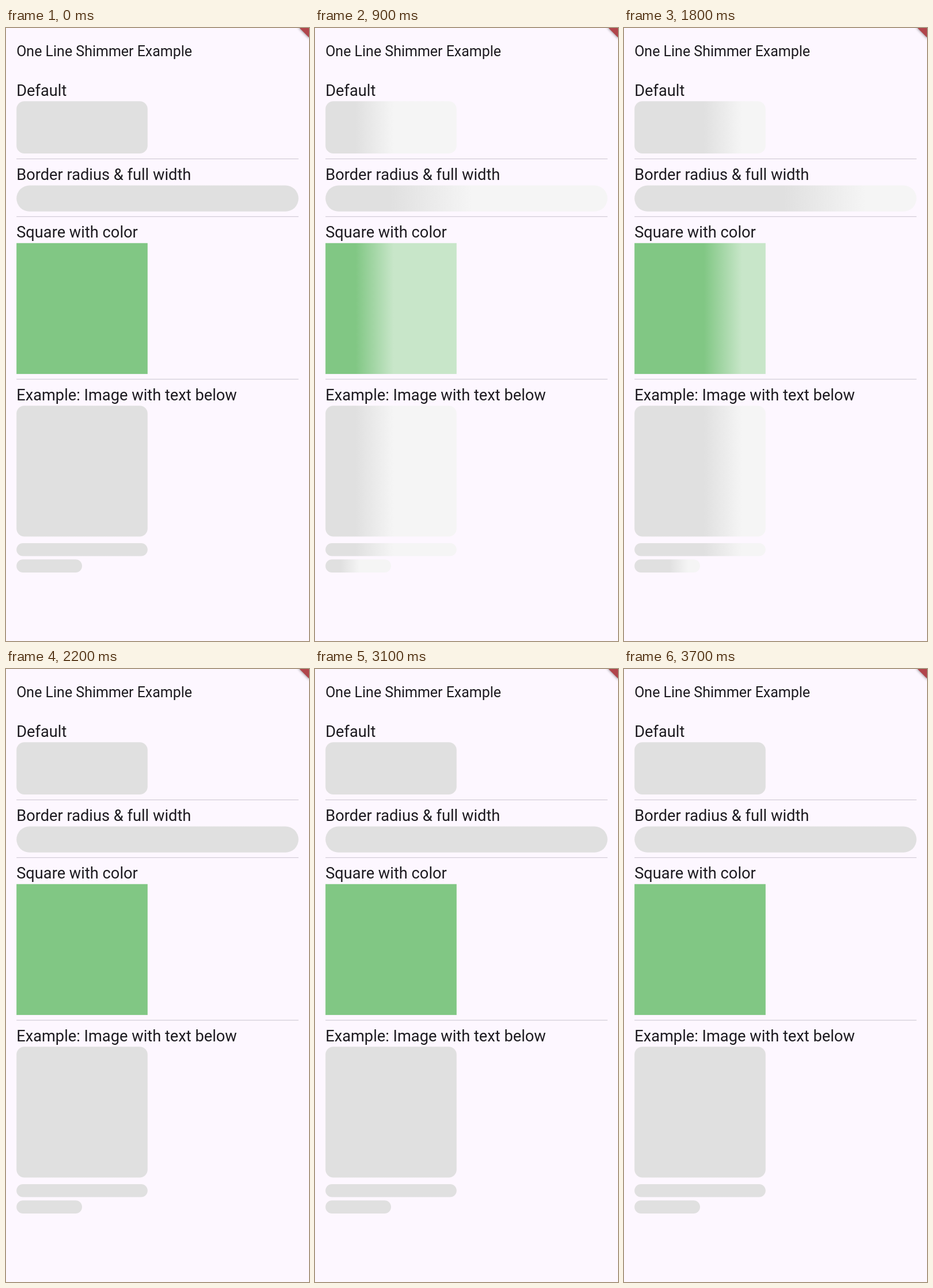
Write an HTML page that moves like this. It is 526 px wide and 1065 px high and loops after 3800 ms.

```html
<!DOCTYPE html>
<html lang="en">
<head>
<meta charset="utf-8">
<title>Shimmer</title>
<style>
  html, body { margin: 0; width: 100%; height: 100%; overflow: hidden; background: #fdf7ff; }
  svg { display: block; width: 526px; height: 1065px; }
  text { font: 27.24px Roboto, sans-serif; fill: #1d1b20; }
  .title { font-size: 24.97px; }
  .rule { fill: #cfc9d4; }
  .grey { fill: url(#grey); }
  .green { fill: url(#green); }
</style>
</head>
<body>
<svg viewBox="0 0 526 1065">
  <defs>
    <linearGradient id="grey"><stop stop-color="#e0e0e0"/><stop offset="1" stop-color="#f5f5f5"/></linearGradient>
    <linearGradient id="green"><stop stop-color="#81c784"/><stop offset="1" stop-color="#c8e6c9"/></linearGradient>
    <filter id="soft" x="-1" y="-1" width="3" height="3"><feGaussianBlur stdDeviation="2.5"/></filter>
  </defs>

  <path d="M507 -2L528 19V-2Z" opacity=".5" filter="url(#soft)"/>
  <path d="M509.5 0H526V16.5Z" fill="#b0454b"/>

  <text class="title" x="18.2" y="49">One Line Shimmer Example</text>

  <text x="18.2" y="118.2">Default</text>
  <rect class="grey" x="18.2" y="127.3" width="227.6" height="90.8" rx="13.6"/>
  <rect class="rule" x="18.2" y="226.8" width="489.6" height="1.14"/>

  <text x="18.2" y="264.3">Border radius &amp; full width</text>
  <rect class="grey" x="18.2" y="273.4" width="489.6" height="45.4" rx="22.7"/>
  <rect class="rule" x="18.2" y="327.1" width="489.6" height="1.14"/>

  <text x="18.2" y="364.4">Square with color</text>
  <rect class="green" x="18.2" y="373.7" width="227.6" height="227.4"/>
  <rect class="rule" x="18.2" y="609.6" width="489.6" height="1.14"/>

  <text x="18.2" y="647">Example: Image with text below</text>
  <rect class="grey" x="18.2" y="656.2" width="227.6" height="227.2" rx="13.6"/>
  <rect class="grey" x="18.2" y="895" width="227.6" height="22.6" rx="11.3"/>
  <rect class="grey" x="18.2" y="923.3" width="113.8" height="22.7" rx="11.3"/>
</svg>
<script>
  const LOOP = 3800, STEP = 100, PERIOD = 750, RESET = 125, RAMP = 0.29;
  const gradients = document.querySelectorAll("linearGradient");
  const start = performance.now();

  function draw() {
    const time = (performance.now() - start) % LOOP;
    const tick = Math.floor(time / STEP) * STEP;
    // The light edge slides right at two widths per second, then resets.
    const phase = (tick - RESET + PERIOD) % PERIOD;
    const edge = 0.18 + phase * 0.002;
    for (const g of gradients) {
      g.setAttribute("x1", edge);
      g.setAttribute("x2", edge + RAMP);
    }
    requestAnimationFrame(draw);
  }
  draw();
</script>
</body>
</html>
```
